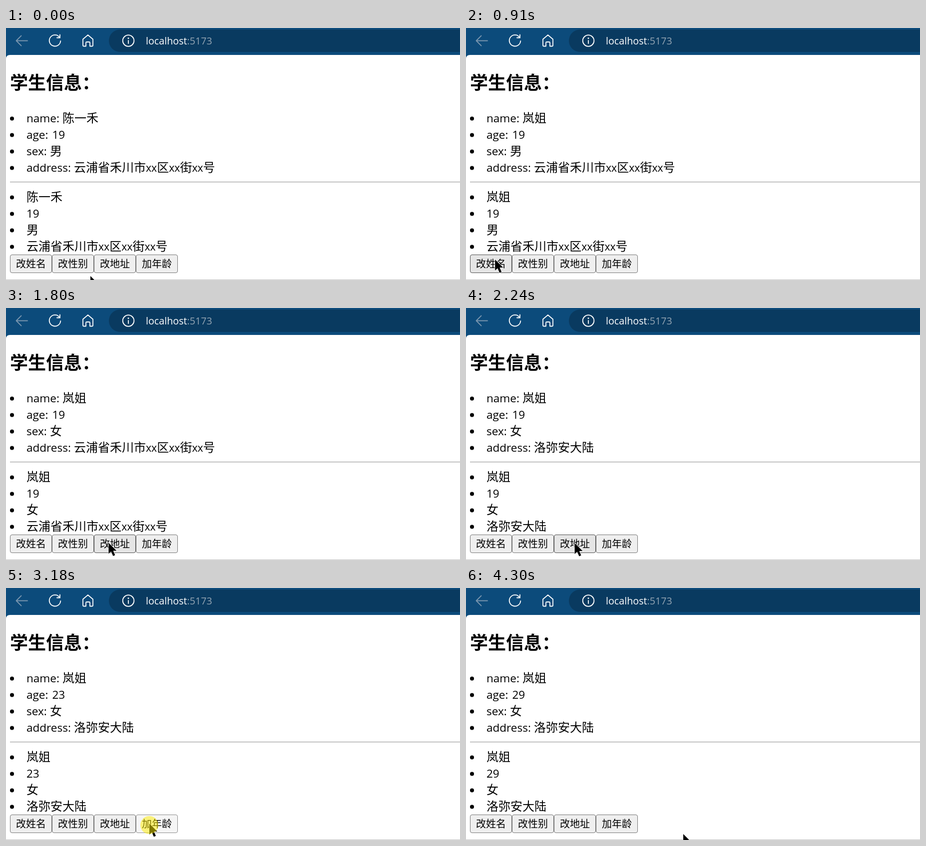
These frames come from a looping animation (909x505 px, 4.32 s). An HTML page:

```html
<!DOCTYPE html>
<html lang="zh-CN">
<head>
<meta charset="utf-8">
<style>
  html, body { margin: 0; width: 100%; height: 100%; overflow: hidden; background: #fff; }
  svg { display: block; }
  text { font: 24px "Noto Sans CJK SC", "Noto Sans CJK", sans-serif; white-space: pre; }
  .latin { font-family: "Open Sans", "Noto Sans", sans-serif; font-size: 22.5px; }
  .xx { font-family: "Open Sans", "Noto Sans", sans-serif; font-size: 21.2px; }
  .url { font-family: "Open Sans", "Noto Sans", sans-serif; font-size: 19.7px; fill: #fff; }
  .title { font-size: 36px; font-weight: bold; }
  .icon { fill: none; stroke: #fff; stroke-width: 1.8; stroke-linecap: round; stroke-linejoin: round; }
  .button rect { fill: #efefef; stroke: #767676; }
  .button text { font-size: 20px; }
  .button.hover rect { fill: #e5e5e5; stroke: #4f4f4f; }
  .button.active rect { fill: #f5f5f5; stroke: #8d8d8d; }
</style>
</head>
<body>
<svg width="909" height="505" viewBox="0 0 909 505">
  <rect width="909" height="70" fill="#0c4b7b"/>
  <path d="M909 3H228.500a22.500 22.500 0 0 0 0 45H909z" fill="#093a60"/>
  <path d="M0 505V62Q0 54 8 54H909V505z" fill="#fff"/>

  <g class="icon">
    <path d="M43 25.500H21M30.500 15.500L20.500 25.500L30.500 35.500" stroke="#7895ae"/>
    <path d="M107.200 18.500A11.300 11.300 0 1 0 109.300 26M108 13.500V19.500H102"/>
    <path d="M154 22.500L164 14L174 22.500V35Q174 36.500 172.500 36.500H168V29.500Q168 28 166.500 28H161.500Q160 28 160 29.500V36.500H155.500Q154 36.500 154 35z"/>
    <circle cx="245" cy="25.500" r="11.300"/>
    <path d="M245 25V31"/>
    <circle cx="245" cy="20.500" r=".6"/>
  </g>
  <text class="url" x="280" y="33">localhost<tspan fill="#91a3b2">:5173</tspan></text>

  <text class="title" x="8" y="123">学生信息：</text>
  <g id="list"></g>
  <path d="M8 308.500H909" stroke="#9a9a9a"/>
  <path d="M8 309.500H909" stroke="#eee"/>
  <path d="M0 504.500H909" stroke="#c4c4c4"/>
  <g id="buttons"></g>
  <path id="cursor" d="M0 0V22L5 17.500L9 26.500L13 24.800L9.200 16H16z" stroke="#fff" stroke-width="1.500" paint-order="stroke"/>
  <circle id="halo" r="18" fill="#ffee00" opacity=".5"/>
</svg>
<script>
const LOOP = 4320;
const $ = id => document.getElementById(id);
const labels = [["name:", 113], ["age:", 92.500], ["sex:", 88], ["address:", 136]];
const captions = ["改姓名", "改性别", "改地址", "加年龄"];

// Cursor moves: first step, last step, number of steps, destination
const start = [169, 497];
const moves = [
  [30, 170, 5, [53, 464]],
  [910, 1060, 6, [123, 463]],
  [1660, 1810, 6, [212, 471]],
  [2240, 2420, 6, [287, 472]],
  [4200, 4300, 4, [435, 493]]
];
const presses = [
  [540, 640], [1290, 1390], [1920, 2020], [2680, 2910], [2970, 3020], [3070, 3120],
  [3180, 3240], [3470, 3640], [3700, 3760], [3810, 3870], [3920, 3980], [4040, 4100]
];
const birthdays = [2800, ...presses.slice(3).map(p => p[1])];

const rich = s => s
  .replace(/xx/g, '<tspan class="xx">xx</tspan>')
  .replace(/^\d+$/, '<tspan class="latin">$&</tspan>');

let rows = "";
labels.forEach(([label, x], i) => {
  const top = 189 + 33 * i, low = 347 + 33 * i;
  rows += `<circle cx="12" cy="${top - 7.500}" r="4"/><circle cx="12" cy="${low - 7.500}" r="4"/>
    <text class="latin" x="41" y="${top}">${label}</text>
    <text class="value" x="${x}" y="${top}"></text><text class="value" x="41" y="${low}"></text>`;
});
$("list").innerHTML = rows;
$("buttons").innerHTML = captions.map((c, i) => `<g class="button">
  <rect x="${8.500 + 84 * i}" y="454.500" width="83" height="36" rx="3.500"/>
  <text x="${20 + 84 * i}" y="479.500">${c}</text></g>`).join("");
const values = document.querySelectorAll(".value");
const buttons = document.querySelectorAll(".button");

function cursorAt(t) {
  let pos = start;
  for (const [from, to, steps, dest] of moves) {
    if (t < from) break;
    const k = Math.min(1, (Math.floor((t - from) / (to - from) * (steps - 1)) + 1) / steps);
    const e = k * k * (3 - 2 * k);
    pos = pos.map((v, i) => v + (dest[i] - v) * e);
  }
  return pos;
}

function draw(t) {
  const [x, y] = cursorAt(t);
  const pressed = presses.some(([a, b]) => t >= a && t < b);
  const info = [
    t < 640 ? "陈一禾" : "岚姐",
    String(19 + birthdays.filter(b => t >= b).length),
    t < 1390 ? "男" : "女",
    t < 2020 ? "云浦省禾川市xx区xx街xx号" : "洛弥安大陆"
  ];
  values.forEach((el, i) => {
    const html = rich(info[i >> 1]);
    if (el.data !== html) el.innerHTML = el.data = html;
  });
  const over = y > 454 && y < 491 ? Math.floor((x - 8) / 84) : -1;
  buttons.forEach((el, i) => {
    el.classList.toggle("hover", i === over);
    el.classList.toggle("active", i === over && pressed);
  });
  $("cursor").setAttribute("transform", `translate(${x} ${y})`);
  $("halo").setAttribute("transform", `translate(${x} ${y + 3})`);
  $("halo").style.display = pressed ? "" : "none";
}

const began = performance.now();
function tick() {
  draw((performance.now() - began) % LOOP);
  requestAnimationFrame(tick);
}
tick();
</script>
</body>
</html>
```
